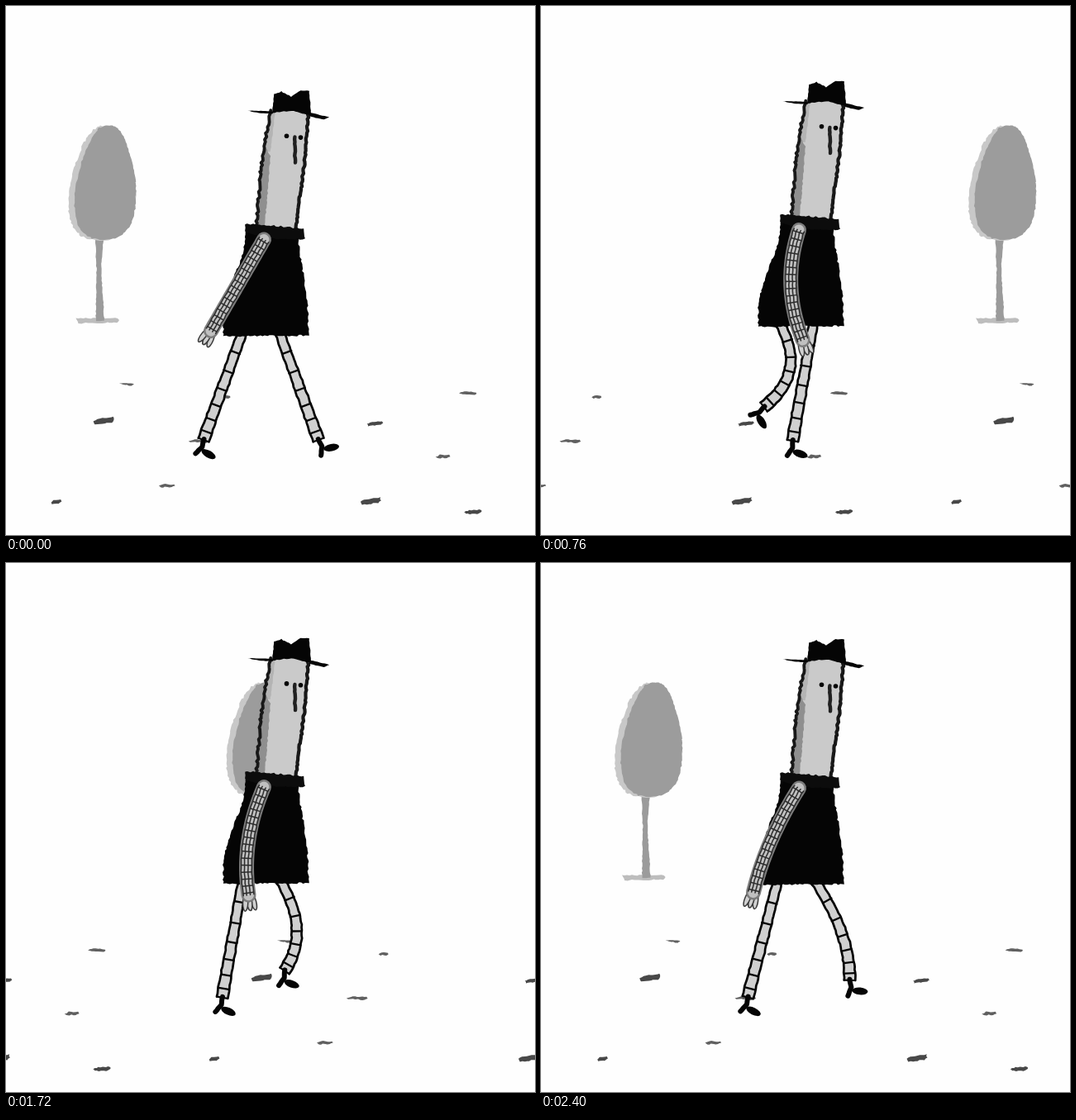
Recreate the animation shown at these times as an HTML page with a canvas. Size 640 by 640 pixels, loop 2.44 s.

```html
<!DOCTYPE html>
<html lang="en">
<head>
<meta charset="utf-8">
<title>Walk</title>
<style>
html, body { margin: 0; width: 100%; height: 100%; overflow: hidden; background: #fefefe; }
canvas { display: block; width: 640px; height: 640px; }
</style>
</head>
<body>
<canvas id="stage" width="640" height="640"></canvas>
<script>
const ctx = document.getElementById('stage').getContext('2d');
const LOOP = 2440, TICK = 40, SPEED = 10.44, STEP = 160;
const INK = '#050505';

let seed = 7;
const rand = () => (seed = (seed * 16807) % 2147483647) / 2147483647;
const jit = a => (rand() - 0.5) * a;
const wobble = Array.from({ length: 64 }, () => jit(1));

const mix = (a, b, t) => a + (b - a) * t;
const smooth = (a, b, x) => {
  const t = Math.min(1, Math.max(0, (x - a) / (b - a)));
  return t * t * (3 - 2 * t);
};
function along(keys, t) {
  const i = Math.max(1, keys.findIndex(k => k[0] >= t));
  const [[t0, a], [t1, b]] = [keys[i - 1], keys[i]];
  return mix(a, b, (t - t0) / (t1 - t0));
}

const fill = (path, color) => { ctx.fillStyle = color; ctx.fill(path); };
const stroke = (path, color, width) => { ctx.strokeStyle = color; ctx.lineWidth = width; ctx.stroke(path); };
function at(x, y, turn, paint) {
  ctx.save();
  ctx.translate(x, y);
  ctx.rotate(turn);
  paint();
  ctx.restore();
}
function trace(fn, n = 36, path = new Path2D()) {
  for (let i = 0; i <= n; i++) path.lineTo(...fn(i / n, i));
  return path;
}
function oval(x, y, rx, ry, turn = 0) {
  const path = new Path2D();
  path.ellipse(x, y, rx, ry, turn, 0, 2 * Math.PI);
  return path;
}

// Hand-drawn edge: straight pieces cut short and shaken.
function rough(pts, shake, closed = true) {
  const path = new Path2D(), ends = closed ? [...pts, pts[0]] : pts;
  for (let i = 1; i < ends.length; i++) {
    const [ax, ay] = ends[i - 1], [bx, by] = ends[i];
    const cuts = Math.ceil(Math.hypot(bx - ax, by - ay) / 3);
    for (let c = 0; c < cuts; c++)
      path.lineTo(mix(ax, bx, c / cuts) + jit(shake), mix(ay, by, c / cuts) + jit(shake));
  }
  closed ? path.closePath() : path.lineTo(...ends[ends.length - 1]);
  return path;
}

// Tree crown: a squarish egg, wide at the bottom
function egg(cx, cy, rx, ry, shake) {
  return trace(u => {
    const a = u * 2 * Math.PI, c = Math.cos(a), s = Math.sin(a);
    const w = Math.sign(c) * Math.abs(c) ** 0.75 * (1 + 0.27 * s);
    return [cx + rx * w - 3 * s + jit(shake), cy + ry * s + jit(shake)];
  }, 120);
}
const leafBack = egg(117, 214, 39, 69, 2);
const leaf = egg(121, 213.5, 35.5, 69, 1.6);
const trunk = rough([[108, 281], [118, 281], [115, 315], [119, 381], [108.5, 381], [109.5, 320]], 1);
const base = rough([[85, 378], [132, 377], [137, 380], [134, 383], [88, 384]], 1.5);

// x, y, length, height; thin dashes fall to the right, fat ones rise
const marks = [
  [146, 457.5, 18, 2], [118.5, 501.5, 25, 7], [194.5, 580.5, 19, 3.5], [60.5, 600, 13, 5],
  [233.5, 526.5, 25, 3], [441, 599, 25, 6.5], [565, 612, 22, 4.5], [528.5, 545, 17, 4],
  [446.5, 505, 20, 5], [558.5, 468.5, 22, 3], [266, 473, 12, 3.5]
].map(([x, y, len, h]) => {
  const dx = len / 2, dy = (4 - h) * 0.4;
  return {
    path: rough([[x - dx, y - dy], [x - dx * 0.4, y - dy - h / 2], [x + dx - 1, y + dy - h / 2],
      [x + dx, y + dy], [x + dx - 3, y + dy + h / 2], [x - dx + 2, y - dy + h / 2]], 1.3),
    color: h > 4 ? '#484848' : '#606060'
  };
});

// Figure
const faceL = [[321, 114], [313, 152], [308, 190], [303, 254]];
const faceR = [[366, 117], [361, 180], [350.5, 258]];
const face = rough([...faceL, ...[...faceR].reverse()], 0);
const faceDim = rough([[321, 115], [326, 116], [320, 165], [312, 165]], 1);
const faceShade = rough([[314, 160], [320, 170], [313, 256], [303, 256], [308, 190]], 1.2);
const edgeL = rough(faceL, 2.2, false), edgeR = rough(faceR, 1.8, false);
const nose = rough([[349, 147], [350, 178]], 1, false);
const crown = rough([[322, 118], [324, 95], [333, 92], [345, 98], [356, 91], [367, 91], [369, 121], [345, 115]], 1);
const brimL = rough([[292, 115], [322, 116], [323, 119], [306, 118]], 0.5);
const brimR = rough([[366, 117], [391, 123], [385, 126], [367, 122]], 0.5);
const collar = rough([[290, 252], [315, 253.5], [361, 258], [361, 270], [330, 271], [290, 263]], 2);
const coat = rough([[290, 262], [287, 288], [270, 332], [263, 360], [263, 388], [366, 387], [365, 350], [353, 268]], 2);
const toe = oval(9.5, 15.5, 9.5, 4.4, 0.3);
const heel = rough([[0, -1], [0, 9], [-6, 18]], 0.6, false);

// Bent limb through a, m, e; gives the point at share u, shifted sideways.
function limb(ax, ay, mx, my, ex, ey) {
  const cx = 2 * mx - (ax + ex) / 2, cy = 2 * my - (ay + ey) / 2;
  return (u, off = 0) => {
    const dx = mix(cx - ax, ex - cx, u), dy = mix(cy - ay, ey - cy, u), len = Math.hypot(dx, dy);
    return [mix(mix(ax, cx, u), mix(cx, ex, u), u) - dy / len * off,
            mix(mix(ay, cy, u), mix(cy, ey, u), u) + dx / len * off];
  };
}
const rung = (pt, u, w) => trace(v => pt(u, mix(-w, w, v)), 1);

// One step: quick off the contact pose, slow through the passing pose.
function pose(s) {
  const u = s + 2.4 * s * (1 - s) ** 2.5;
  return {
    u,
    bob: 11.5 * (2 * u - 1) ** 12,
    lift: 1 - (2 * u - 1) ** 4,
    swap: 43 * smooth(0.55, 0.82, u),
    reach: 105 * Math.sin(Math.PI * u ** 1.75) ** 2.8
  };
}

const swingX = [[0, 239], [0.52, 265], [0.63, 317], [0.82, 329], [0.93, 378], [1, 378]];

function drawLeg(hip, x, y, bend, bob, turn) {
  const top = 381 + bob;
  const pt = limb(hip, top, (hip + x) / 2 + 23 * bend, (top + y) / 2 + 5 * bend, x, y);
  const half = u => 5.3 + 1.5 * u;
  const side = s => (u, i) => pt(u, s * half(u) + wobble[i + 10 + 10 * s] * 1.1);
  const left = side(-1), right = side(1);
  const skin = trace(right);
  trace((u, i) => left(1 - u, 36 - i), 36, skin);
  fill(skin, '#d0d0d0');
  stroke(trace(right), INK, 2.7);
  stroke(trace(left), INK, 2.7);
  for (let i = 0; i < 6; i++) stroke(rung(pt, 0.2 + 0.185 * i - 0.008 * i * i, half(0.5)), INK, 2.3);
  stroke(rung(pt, 1, 6.5), INK, 2.2);
  at(x, y, turn * Math.PI / 180, () => {
    stroke(heel, INK, 6);
    fill(toe, INK);
  });
}

function drawLegs({ u, bob, lift, swap }) {
  drawLeg(287 + swap, along(swingX, u), 525 - 40 * lift, lift, bob, 12 - 40 * u + 50 * Math.sin(Math.PI * u));
  drawLeg(330 - swap, mix(378, 239, u), 525 + lift, 0, bob, 12 * u ** 3 - 28 * (1 - u) ** 6);
}

function drawArm({ bob, lift, reach }) {
  const x = 248 + reach, y = 393 + 11 * lift, top = 271 + bob;
  const pt = limb(312, top, (312 + x) / 2 - 12 * lift, (top + y) / 2, x, y);
  const [px, py] = pt(0.9);
  at(x, y, Math.atan2(y - py, x - px), () => {
    for (const k of [-1, 0, 1]) {
      const finger = oval(9, k * 5, 10, 3.1, k * 0.14);
      fill(finger, '#d0d0d0');
      stroke(finger, '#3a3a3a', 1.5);
    }
  });
  const spine = trace(u => pt(u));
  stroke(spine, '#7c7c7c', 18);
  stroke(spine, '#c0c0c0', 13);
  for (const off of [-6.4, -2, 2.4, 6.4])
    stroke(trace((u, i) => pt(u, off + wobble[i] * 0.8)), '#2c2c2c', 1.5);
  for (let u = 0.02; u < 1; u += 0.064) stroke(rung(pt, u, 6.2), '#2c2c2c', 1.5);
}

function drawBody() {
  fill(face, '#cacaca');
  fill(faceDim, '#b4b4b4');
  fill(faceShade, '#8f8f8f');
  stroke(edgeL, '#181818', 3.8);
  stroke(edgeR, '#181818', 4.2);
  stroke(nose, '#202020', 4.4);
  fill(oval(339.5, 145.8, 2.8, 2.8), INK);
  fill(oval(356.5, 147.6, 2.8, 2.8), INK);
  for (const part of [brimL, brimR, crown, coat]) fill(part, INK);
  fill(collar, '#0c0c0c');
}

function drawScenery() {
  fill(base, '#bdbdbd');
  fill(trunk, '#9b9b9b');
  fill(leafBack, '#c8c8c8');
  fill(leaf, '#9c9c9c');
  marks.forEach(m => fill(m.path, m.color));
}

function draw(tick) {
  const dist = SPEED * tick, now = pose(dist / STEP % 1);
  ctx.fillStyle = '#fefefe';
  ctx.fillRect(0, 0, 640, 640);
  at(-dist, 0, 0, drawScenery);
  at(640 - dist, 0, 0, drawScenery);
  drawLegs(now);
  at(0, now.bob, 0, drawBody);
  drawArm(now);
}

ctx.lineCap = ctx.lineJoin = 'round';
const start = performance.now();
function frame() {
  const t = Math.max(0, performance.now() - start) % LOOP;
  draw(Math.floor(t / TICK));
  requestAnimationFrame(frame);
}
frame();
</script>
</body>
</html>
```
